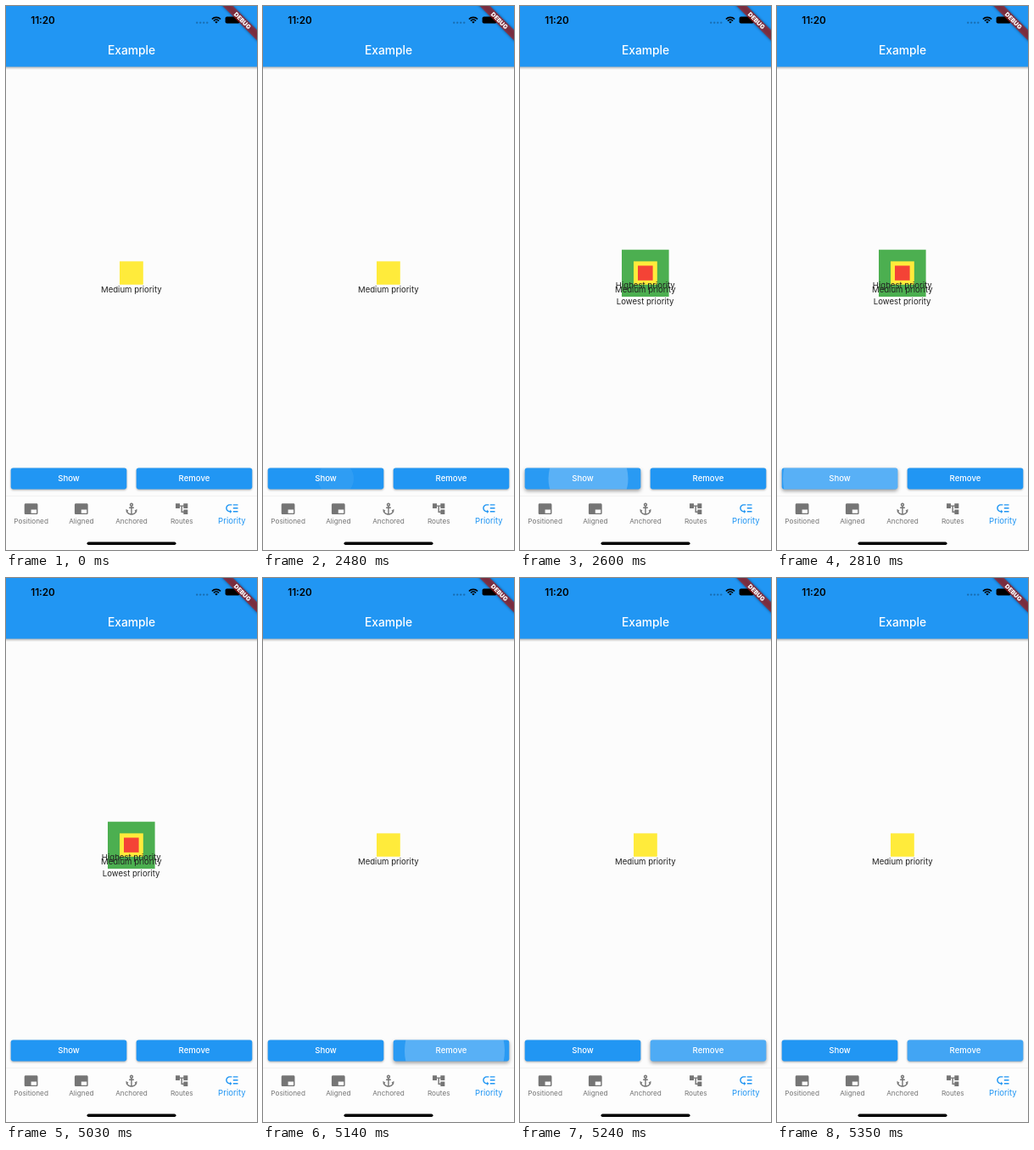
These frames come from a looping animation (296x640 px, 5450 ms). An HTML page:

```html
<!DOCTYPE html>
<html lang="en">
<head>
<meta charset="utf-8">
<title>Example</title>
<style>
  html, body { margin: 0; width: 100%; height: 100%; overflow: hidden; background: #fcfcfc; }
  svg { display: block; width: 100%; height: 100%; }
  text { font-family: Inter, "Open Sans", sans-serif; text-anchor: middle; }

  .title { font-size: 13.8px; font-weight: 500; fill: #fff; }
  .clock { font-size: 11.7px; font-weight: 600; }
  .debug { font-size: 7.1px; font-weight: 900; fill: #fff; }
  .body { font-size: 9.6px; fill: #212121; }
  .action { font-size: 9.6px; font-weight: 500; fill: #fff; }
  .tab { font-size: 8.2px; fill: #757575; }
  .tab.active { font-size: 9.6px; fill: #2196f3; }

  .button { fill: #2196f3; filter: drop-shadow(0 1.2px 1px rgba(0, 0, 0, .32)); }
  .ripple, .glow { fill: #fff; opacity: 0; }

  /* Screen changes are hard cuts, so every track holds between keys. */
  .stacked, .button, .ripple, .glow { animation: 5450ms step-end infinite; }
  .stacked { visibility: hidden; animation-name: stack; }
  .show .button { animation-name: lift-show; }
  .show .ripple { animation-name: ripple-show; }
  .show .glow { animation-name: glow-show; }
  .remove .button { animation-name: lift-remove; }
  .remove .ripple { animation-name: ripple-remove; }
  .remove .glow { animation-name: glow-remove; }

  @keyframes stack {
    0% { visibility: hidden; }
    47.7% { visibility: visible; }
    94.31%, 100% { visibility: hidden; }
  }
  @keyframes lift-show {
    47.7% { filter: drop-shadow(0 2.2px 2px rgba(0, 0, 0, .4)); }
    51.74% { filter: drop-shadow(0 1.2px 1px rgba(0, 0, 0, .32)); }
  }
  @keyframes ripple-show {
    0% { opacity: 0; }
    45.5% { opacity: .07; cx: 86px; r: 21px; }
    47.7% { opacity: .23; cx: 80.5px; r: 47px; }
    49.72% { opacity: .22; cx: 75px; r: 68px; }
    51.74%, 100% { opacity: 0; }
  }
  @keyframes glow-show {
    0% { opacity: 0; }
    47.7% { opacity: .04; }
    51.74% { opacity: .17; }
    53.76% { opacity: .11; }
    92.29%, 100% { opacity: 0; }
  }
  @keyframes lift-remove {
    94.31% { filter: drop-shadow(0 2.2px 2px rgba(0, 0, 0, .4)); }
    98.16% { filter: drop-shadow(0 1.2px 1px rgba(0, 0, 0, .32)); }
  }
  @keyframes ripple-remove {
    0% { opacity: 0; }
    94.31% { opacity: .22; cx: 226px; r: 59px; }
    96.14% { opacity: .17; cx: 222px; r: 72px; }
    98.16%, 100% { opacity: 0; }
  }
  @keyframes glow-remove {
    0% { opacity: 0; }
    94.31% { opacity: .04; }
    98.16%, 100% { opacity: .15; }
  }
</style>
</head>
<body>
<svg viewBox="0 0 296 640">
  <defs>
    <linearGradient id="fade" x2="0" y2="1">
      <stop stop-color="#000" stop-opacity=".3"/>
      <stop offset="1" stop-color="#000" stop-opacity="0"/>
    </linearGradient>
    <clipPath id="show-clip"><rect x="5.7" y="543.4" width="136.6" height="25" rx="2.8"/></clipPath>
    <clipPath id="remove-clip"><rect x="153.7" y="543.4" width="136.6" height="25" rx="2.8"/></clipPath>
    <filter id="soft" x="-20%" y="-100%" width="140%" height="300%"><feGaussianBlur stdDeviation="1.8"/></filter>
    <path id="window" d="M21 3H3c-1.1 0-2 .9-2 2v14c0 1.1.9 2 2 2h18c1.1 0 2-.9 2-2V5c0-1.1-.9-2-2-2zm0 16h-9v-6h9v6z"/>
  </defs>

  <rect width="296" height="640" fill="#fcfcfc"/>

  <!-- App bar and status bar -->
  <rect y="71" width="296" height="4" fill="url(#fade)"/>
  <rect width="296" height="71.5" fill="#2196f3"/>
  <text class="clock" x="43.5" y="21">11:20</text>
  <g fill="#000" fill-opacity=".27">
    <circle cx="225.2" cy="19.6" r="1.2"/><circle cx="229.2" cy="19.6" r="1.2"/>
    <circle cx="233.2" cy="19.6" r="1.2"/><circle cx="237.2" cy="19.6" r="1.2"/>
  </g>
  <g transform="translate(248 20.6)" fill="none" stroke="#000" stroke-width="1.7">
    <path d="M-5.1-5.1A7.2 7.2 0 0 1 5.1-5.1M-3.1-3.1A4.4 4.4 0 0 1 3.1-3.1"/>
    <path d="M0 0L-1.8-1.8A2.6 2.6 0 0 1 1.8-1.8Z" fill="#000" stroke="none"/>
  </g>
  <rect x="258.6" y="12.6" width="17" height="7.8" rx="2" fill="#000"/>
  <text class="title" x="148" y="56.8">Example</text>
  <g transform="translate(296) rotate(45)">
    <rect x="-42" y="20" width="84" height="8.6" fill="#000" opacity=".5" filter="url(#soft)"/>
    <rect x="-42" y="20" width="84" height="8.6" fill="#b71c1c" opacity=".63"/>
    <text class="debug" y="26.9">DEBUG</text>
  </g>

  <!-- Overlays, lowest priority first -->
  <g class="stacked">
    <rect x="120" y="286.7" width="55.6" height="55.3" fill="#4caf50"/>
    <text class="body" x="147.6" y="351.3">Lowest priority</text>
  </g>
  <rect x="134" y="300.4" width="27.8" height="27.4" fill="#ffeb3b"/>
  <text class="body" x="147.8" y="337.3">Medium priority</text>
  <g class="stacked">
    <rect x="139" y="305.5" width="17.6" height="17.3" fill="#f44336"/>
    <text class="body" x="147.8" y="332">Highest priority</text>
  </g>

  <g class="show">
    <rect class="button" x="5.7" y="543.4" width="136.6" height="25" rx="2.8"/>
    <g clip-path="url(#show-clip)">
      <rect class="glow" x="5" y="543" width="138" height="26"/>
      <circle class="ripple" cx="74" cy="556" r="21"/>
    </g>
    <text class="action" x="74" y="559.3">Show</text>
  </g>
  <g class="remove">
    <rect class="button" x="153.7" y="543.4" width="136.6" height="25" rx="2.8"/>
    <g clip-path="url(#remove-clip)">
      <rect class="glow" x="153" y="543" width="138" height="26"/>
      <circle class="ripple" cx="222" cy="556" r="21"/>
    </g>
    <text class="action" x="222" y="559.3">Remove</text>
  </g>

  <!-- Bottom navigation -->
  <rect y="576.4" width="296" height="1" fill="#000" opacity=".07"/>
  <rect y="577" width="296" height="63" fill="#fdfdfd"/>
  <g fill="#757575">
    <use href="#window" transform="translate(21 583.1) scale(.715)"/>
    <use href="#window" transform="translate(80.2 583.1) scale(.715)"/>
    <path transform="translate(139.4 583.1) scale(.715)" d="M17 15l1.55 1.55c-.96 1.69-3.33 3.04-5.55 3.37V11h3V9h-3V7.82C14.16 7.4 15 6.3 15 5c0-1.65-1.35-3-3-3S9 3.35 9 5c0 1.3.84 2.4 2 2.82V9H8v2h3v8.92c-2.22-.33-4.59-1.68-5.55-3.37L7 15l-4-3v3c0 3.88 4.92 7 9 7s9-3.12 9-7v-3l-4 3zM12 4c.55 0 1 .45 1 1s-.45 1-1 1-1-.45-1-1 .45-1 1-1z"/>
    <path transform="translate(198.6 583.1) scale(.715)" d="M22 11V3h-7v3H9V3H2v8h7V8h2v10h4v3h7v-8h-7v3h-2V8h2v3z"/>
  </g>
  <path fill="#2196f3" transform="translate(257.8 582.6) scale(.715)" d="M14 5h8v2h-8zm0 5.5h8v2h-8zm0 5.5h8v2h-8zM2 11.5C2 15.08 4.92 18 8.5 18H9v2l3-3-3-3v2h-.5C6.02 16 4 13.98 4 11.5S6.02 7 8.5 7H12V5H8.5C4.92 5 2 7.92 2 11.5z"/>
  <text class="tab" x="29.6" y="608.9">Positioned</text>
  <text class="tab" x="88.8" y="608.9">Aligned</text>
  <text class="tab" x="148" y="608.9">Anchored</text>
  <text class="tab" x="207.2" y="608.9">Routes</text>
  <text class="tab active" x="266.4" y="608.6">Priority</text>
  <rect x="95.5" y="630.6" width="105" height="3.5" rx="1.75" fill="#000"/>
</svg>
</body>
</html>
```
